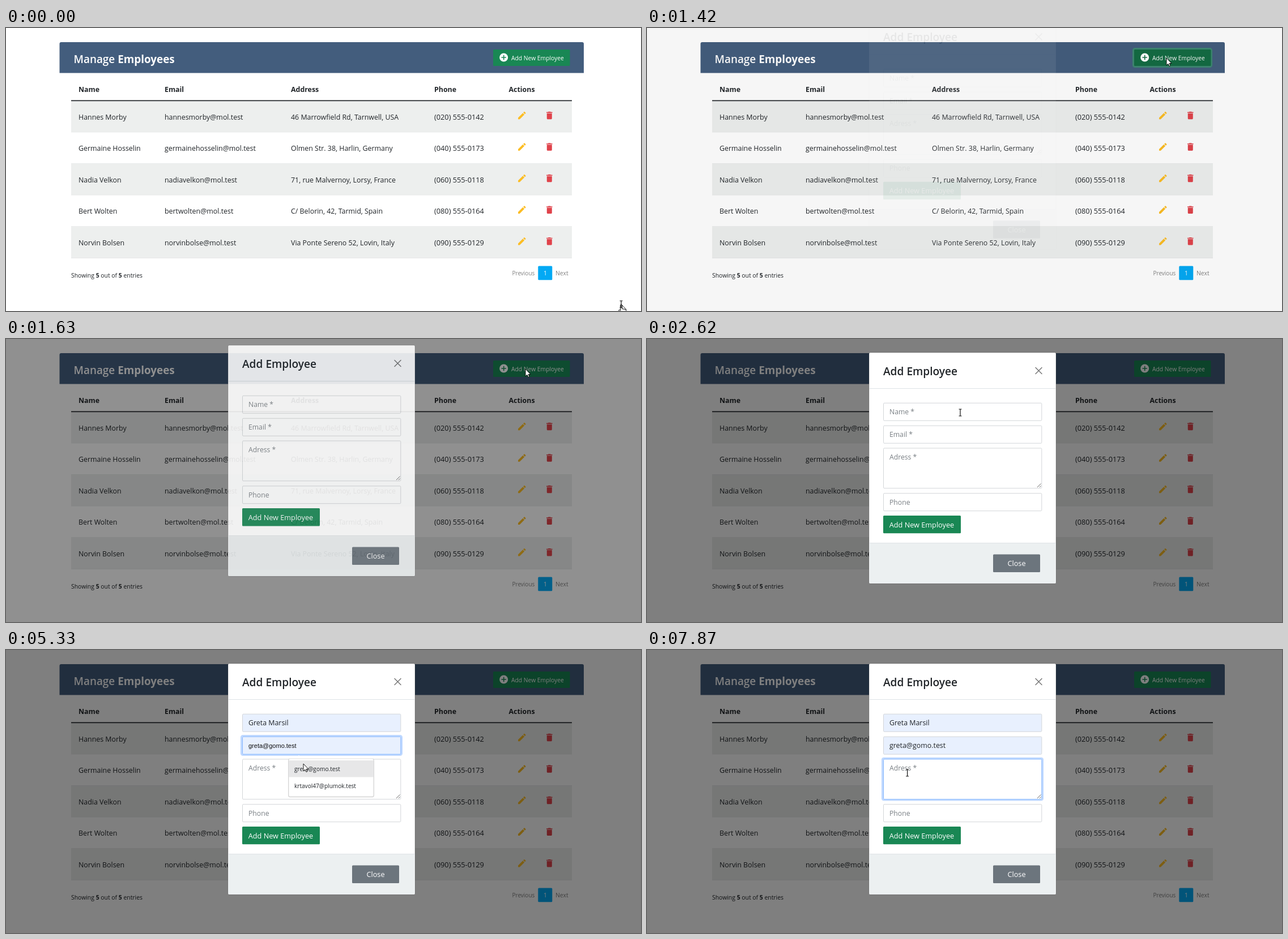
Write an HTML page that moves like this. It is 1121x500 px and loops after 8 s.

```html
<!DOCTYPE html>
<html lang="en">
<head>
<meta charset="utf-8">
<title>Manage Employees</title>
<style>
  html, body { margin: 0; width: 100%; height: 100%; overflow: hidden; background: #fff; }
  svg { display: block; width: 100%; height: 100%; }
  text { font-family: "Open Sans", "Noto Sans", sans-serif; }
  .plain { font-family: "Liberation Sans", Arial, sans-serif; }
</style>
</head>
<body>
<svg id="stage" viewBox="0 0 1121 500" xmlns="http://www.w3.org/2000/svg"></svg>
<script>
const LOOP = 8000;
const INK = '#212529', GREEN = '#198754', AMBER = '#fcbd24', RED = '#e0434b';

const rect = (x, y, w, h, fill, extra = '') =>
  `<rect x="${x}" y="${y}" width="${w}" height="${h}" fill="${fill}" ${extra}/>`;
const text = (x, y, str, size = 12.4, fill = INK, extra = '') =>
  `<text x="${x}" y="${y}" font-size="${size}" fill="${fill}" ${extra}>${str}</text>`;
const group = (id, body, extra = '') => `<g id="${id}" ${extra}>${body}</g>`;

// ---------- page ----------
const PENCIL = 'M3 17.25V21h3.75L17.81 9.94l-3.75-3.75zM20.71 7.04a1 1 0 0 0 0-1.41l-2.34-2.34a1 1 0 0 0-1.41 0l-1.83 1.83 3.75 3.75z';
const TRASH = 'M6 19c0 1.1.9 2 2 2h8c1.1 0 2-.9 2-2V7H6zM19 4h-3.5l-1-1h-5l-1 1H5v2h14z';
const COLUMNS = [[128, 'Name'], [280, 'Email'], [503, 'Address'], [756, 'Phone'], [887.5, 'Actions']];
const EMPLOYEES = [
  ['Hannes Morby', 'hannesmorby', '46 Marrowfield Rd, Tarnwell, USA', '(020) 555-0142'],
  ['Germaine Hosselin', 'germainehosselin', 'Olmen Str. 38, Harlin, Germany', '(040) 555-0173'],
  ['Nadia Velkon', 'nadiavelkon', '71, rue Malvernoy, Lorsy, France', '(060) 555-0118'],
  ['Bert Wolten', 'bertwolten', 'C/ Belorin, 42, Tarmid, Spain', '(080) 555-0164'],
  ['Norvin Bolsen', 'norvinbolse', 'Via Ponte Sereno 52, Lovin, Italy', '(090) 555-0129'],
];
const ROW = 55.55;

const icon = (id, d, x, y, fill) =>
  `<path id="${id}" d="${d}" fill="${fill}" transform="translate(${x} ${y}) scale(.75)"/>`;

function tableRow([name, user, address, phone], i) {
  const top = 129 + ROW * i, base = top + 32.6;
  return rect(115, top, 884, ROW, i % 2 ? '#fff' : '#edefee') +
    rect(115, top + ROW - 1, 884, 1, '#e6e8e8') +
    text(128, base, name) + text(280, base, user + '@mol.test') +
    text(503, base, address) + text(756, base, phone, 12.75) +
    icon('pencil' + i, PENCIL, 901.8, top + 16.5, AMBER) +
    icon('trash' + i, TRASH, 950.3, top + 16.5, RED);
}

const page = `<path d="M94.500 79.500V28q0-3 3-3H1017q3 0 3 3V79.500z" fill="#435d7d"/>` +
  text(119.500, 62, 'Manage <tspan font-weight="700">Employees</tspan>', 18.9, '#fff', 'font-weight="600"') +
  rect(858.5, 36.5, 138, 32, 'none', 'id="addRing" rx="3" stroke="#3c996e" stroke-opacity=".7" stroke-width="3"') +
  rect(860, 38, 135.5, 29, GREEN, 'id="addButton" rx="1.500"') +
  `<circle cx="878.700" cy="52" r="7.500" fill="#fff"/>
   <path id="addPlus" d="M874.500 52h8.400M878.700 47.800v8.400" stroke="${GREEN}" stroke-width="1.600"/>` +
  text(892, 57, 'Add New Employee', 10.3, '#fff') +
  COLUMNS.map(([x, label]) => text(x, 112.6, label, 12.4, INK, 'font-weight="700"')).join('') +
  EMPLOYEES.map(tableRow).join('') +
  rect(115, 127.5, 884, 1.7, INK) +
  text(115, 441, 'Showing <tspan font-weight="700">5</tspan> out of <tspan font-weight="700">5</tspan> entries', 10.4) +
  text(893.5, 437, 'Previous', 10, '#828282') +
  rect(939.3, 420.5, 25, 24.7, '#03a9f4', 'rx="1.500"') +
  text(952, 437, '1', 10.4, '#fff', 'text-anchor="middle"') +
  text(970, 437, 'Next', 10.4, '#828282');

// ---------- dialog ----------
const FIELDS = [
  { id: 'name', hint: 'Name *', y: 113, h: 31, value: 'Greta Marsil', focus: 2760, blur: 4460, preview: 3550, filled: 3980 },
  { id: 'email', hint: 'Email *', y: 153, h: 31, value: 'greta@gomo.test', focus: 4460, blur: 6130, preview: 5130, filled: 5600 },
  { id: 'address', hint: 'Adress *', y: 192.7, h: 70.8, focus: 6130, blur: Infinity },
  { id: 'phone', hint: 'Phone', y: 272.5, h: 31, focus: Infinity, blur: Infinity },
];

function field({ id, hint, y, h, value = '' }) {
  const base = y + 20.2;
  const grip = id === 'address' ? '<path d="M689 262l6.500-6.500M693 262l2.500-2.500" stroke="#666" stroke-width="1"/>' : '';
  return rect(415.6, y - 1.4, 282.8, h + 2.8, 'none', `id="${id}Ring" rx="2.500" stroke="#0d6efd" stroke-opacity=".26" stroke-width="3.300"`) +
    rect(417.5, y + .2, 279.3, h, '#fff', `id="${id}Box" rx="1.500" stroke="#d3d6d9"`) +
    text(428, base, hint, 12.2, '#797f84', `id="${id}Hint"`) +
    text(428, base, value, 12.4, INK, `id="${id}Value"`) +
    text(428, base, value, 11, '#111', `id="${id}Preview" class="plain"`) +
    rect(428, y + 7.6, 1, 16.4, '#000', `id="${id}Caret"`) + grip;
}

function suggestions(id, y, w, items) {
  const h = items.length * 30 + 7;
  return group(id,
    `<path d="M510 ${y + .5}l7-6.500 7 6.500z" fill="#fff"/>` +
    rect(498, y + .5, w + 2, h + 1, '#000', 'rx="3" opacity=".1"') +
    rect(499, y, w, h, '#fff', 'rx="2" stroke="#000" stroke-opacity=".13"') +
    rect(499, y + 3, w, 29.5, '#e7e7e8', `id="${id}Hover"`) +
    items.map((item, i) => text(509, y + 22 + 30 * i, item, 10.1)).join(''));
}

const dialog = rect(392, 24, 330, 408, '#fff', 'rx="2" stroke="#000" stroke-opacity=".2"') +
  rect(392, 87, 330, 1, '#dee2e6') +
  text(417, 63.7, 'Add Employee', 19.1, INK, 'font-weight="600"') +
  '<path d="M686 50.500l11 11M697 50.500l-11 11" stroke="#777" stroke-width="1.500" stroke-linecap="round"/>' +
  FIELDS.map(field).join('') +
  rect(417, 312, 137, 31.3, GREEN, 'rx="1.500"') +
  text(427.8, 332.6, 'Add New Employee', 12.7, '#fff') +
  rect(392.5, 360, 329, 71.5, '#ecf0f1') + rect(392.5, 360, 329, 1, '#dee2e6') +
  rect(611, 380.5, 83, 31.5, '#6c757d', 'rx="1.500"') +
  text(652.5, 401.4, 'Close', 12.7, '#fff', 'text-anchor="middle"') +
  suggestions('nameList', 152, 100, ['Greta Marsil', 'Greta Marsil', 'Norvin Bolsen']) +
  suggestions('emailList', 192, 150, ['greta@gomo.test', 'krtavol47@plumok.test']);

// ---------- pointer ----------
const POINTERS = {
  arrow: '<path d="M0 0V13L3 10.200L5 14.500L7 13.600L5.100 9.500H9z" fill="#fff" stroke="#000" stroke-width=".9"/>',
  hand: '<path d="M-1.500 1.500q1.500-2 3 0V8l6 1.300q1.500.6 1.300 2.500l-1.300 5.200v2.500H0v-2l-4.500-6q0-2 2-1.200l1 1z" fill="#fff" stroke="#111" stroke-width="1"/><path d="M2 12v4M4.200 12v4M6.400 12v4" stroke="#111" stroke-width=".6"/>',
  beam: '<path d="M-2.500-6H2.500M0-6V6M-2.500 6H2.500" fill="none" stroke="#111" stroke-width="1.200"/>',
};
const PATH = [
  [260, 1086, 488], [420, 1030, 390], [530, 935, 232], [600, 958, 164], [760, 948, 104], [940, 917, 53],
  [1640, 917, 53], [2020, 798, 84], [2090, 780, 88], [2620, 553, 130], [3400, 553, 130], [3700, 550, 169],
  [4050, 550, 169], [4380, 530, 169], [4990, 530, 169], [5300, 525, 201], [5660, 525, 201],
  [6060, 461, 215], [7400, 461, 215], [7410, 459.6, 217],
];
const SHAPES = [
  [260, 'arrow'], [560, 'hand'], [640, 'arrow'], [860, 'hand'], [1410, 'arrow'], [2560, 'beam'],
  [3550, 'arrow'], [4250, 'beam'], [5100, 'arrow'], [5850, 'beam'],
];
const CLICKS = [1270, 2700, 3820, 4400, 5500, 6070];

const stage = document.getElementById('stage');
stage.innerHTML = group('page', page) +
  rect(0, 0, 1121, 500, '#000', 'id="shade"') +
  group('dialog', dialog) +
  '<circle id="click" r="10" fill="#f6ec28" style="mix-blend-mode:multiply"/>' +
  group('pointer', Object.entries(POINTERS).map(([id, body]) => group(id, body)).join(''));

const parts = {};
stage.querySelectorAll('[id]').forEach(el => parts[el.id] = el);

const set = (id, name, value) => parts[id].setAttribute(name, value);
const alpha = (id, value) => set(id, 'opacity', +value);
const ramp = (t, start, length) => Math.min(1, Math.max(0, (t - start) / length));
const during = (t, start, end) => t >= start && t < end;

function pointerAt(t) {
  const next = PATH.findIndex(([time]) => time > t);
  if (next < 0) return PATH.at(-1).slice(1);
  const [t0, x0, y0] = PATH[Math.max(0, next - 1)], [t1, x1, y1] = PATH[next];
  const k = ramp(t, t0, t1 - t0);
  return [x0 + (x1 - x0) * k, y0 + (y1 - y0) * k];
}

function drawField(t, { id, focus, blur, preview = Infinity, filled = Infinity }) {
  const focused = during(t, focus, blur);
  const glow = focus < LOOP ? ramp(t, focus, 130) - ramp(t, blur, 130) : 0;
  alpha(id + 'Ring', glow);
  set(id + 'Box', 'stroke', focused ? '#86b7fe' : '#d3d6d9');
  set(id + 'Box', 'fill', t >= preview ? '#e8f0fe' : '#fff');
  alpha(id + 'Hint', t < preview);
  alpha(id + 'Preview', during(t, preview, filled));
  alpha(id + 'Value', t >= filled);
  alpha(id + 'Caret', focused && t < filled && Math.floor((t - focus) / 532) % 2 === 0);
}

function drawPointer(t) {
  const [x, y] = pointerAt(t);
  const shape = SHAPES.filter(([time]) => time <= t).pop();
  for (const id in POINTERS) alpha(id, shape && shape[1] === id);
  set('pointer', 'transform', `translate(${x} ${y})`);
  set('click', 'cx', x - 1);
  set('click', 'cy', y);
  alpha('click', .85 * CLICKS.some(time => during(t, time, time + 150)));
}

function render(t) {
  const passing = during(t, 540, 690);
  set('pencil1', 'fill', passing ? '#fdd08a' : AMBER);
  set('trash1', 'fill', passing ? '#e2674a' : RED);

  const buttonColor = during(t, 1290, 1530) ? '#146c43' : during(t, 880, 1600) ? '#157347' : GREEN;
  set('addButton', 'fill', buttonColor);
  set('addPlus', 'stroke', buttonColor);
  alpha('addRing', ramp(t, 1290, 100) - ramp(t, 1500, 120));

  const shown = ramp(t, 1402, 262);
  alpha('shade', shown / 2);
  alpha('dialog', shown);
  set('dialog', 'transform', `translate(0 ${-41 * (1 - ramp(t, 1417, 443)) ** 1.75})`);

  FIELDS.forEach(f => drawField(t, f));
  alpha('nameList', ramp(t, 2780, 100) - ramp(t, 3980, 100));
  alpha('nameListHover', t >= 3550);
  alpha('emailList', ramp(t, 4600, 100) - ramp(t, 5600, 100));
  alpha('emailListHover', t >= 5130);
  drawPointer(t);
}

const start = performance.now();
function tick() {
  render((performance.now() - start) % LOOP);
  requestAnimationFrame(tick);
}
tick();
</script>
</body>
</html>
```
